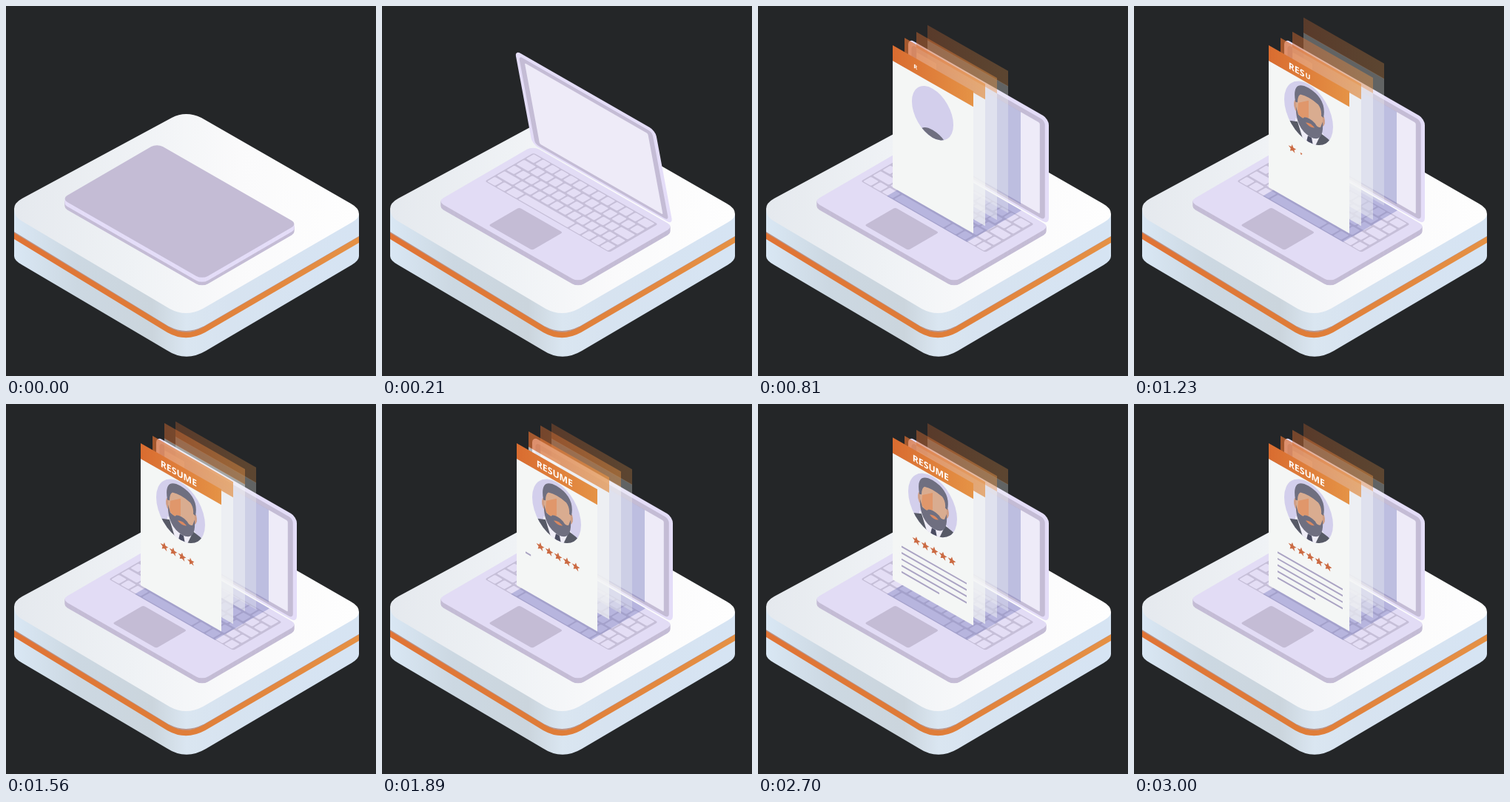
An HTML page with a canvas for the animation above (3.63 s loop, 500 by 500 pixels).

```html
<!DOCTYPE html>
<html lang="en">
<head>
<meta charset="utf-8">
<title>Resume on a laptop</title>
<style>
html, body { margin: 0; width: 100%; height: 100%; overflow: hidden; background: #242628; }
canvas { display: block; }
</style>
</head>
<body>
<canvas id="stage" width="500" height="500"></canvas>
<script>
const ctx = document.getElementById('stage').getContext('2d');
const LOOP = 3630, END = 3000, STEP = 30;
const W = 218, D = 150;            // laptop plane, in local units
const LILAC = '#e2dcf5', MAUVE = '#c4bcd5', RIM = '#e4ddf8';
const SHADE = 'rgba(104,108,180,.36)';

const prog = (t, start, dur) => Math.min(1, Math.max(0, (t - start) / dur));
const easeOut = p => 1 - (1 - p) ** 2;
const easeInOut = p => (1 - Math.cos(Math.PI * p)) / 2;
const backOut = p => 1 + 2.70158 * (p - 1) ** 3 + 1.70158 * (p - 1) ** 2;

function gradient(x0, x1, ...stops) {
  const g = ctx.createLinearGradient(x0, 0, x1, 0);
  stops.forEach(([at, color]) => g.addColorStop(at, color));
  return g;
}
function fill(path, color) {
  ctx.fillStyle = color;
  ctx.fill(new Path2D(path));
}
function stroke(path, color, width) {
  ctx.strokeStyle = color;
  ctx.lineWidth = width;
  ctx.stroke(new Path2D(path));
}
function box(x, y, w, h, r, color) {
  ctx.fillStyle = color;
  ctx.beginPath();
  ctx.roundRect(x, y, w, h, r);
  ctx.fill();
}
// Draws in a tilted plane spanned by a (W units) and b (D units)
function onPlane(x, y, a, b, draw) {
  ctx.save();
  ctx.transform(a[0] / W, a[1] / W, b[0] / D, b[1] / D, x, y);
  draw();
  ctx.restore();
}
function scaled(x, y, s, draw) {
  if (s <= 0) return;
  ctx.save();
  ctx.translate(x, y);
  ctx.scale(s, s);
  draw();
  ctx.restore();
}

const sideFill = gradient(11, 477, [0, '#d9e7f4'], [.18, '#ccd8e2'], [.4, '#cbd5dd'], [.5, '#dae6f1'], [.62, '#d7e3f0'], [1, '#d6e4f3']);
const topFill = gradient(11, 477, [0, '#e5e9ee'], [.35, '#eff2f5'], [.65, '#fafafb'], [1, '#fefefe']);
const bandFill = gradient(11, 477, [0, '#e07436'], [.45, '#df7c38'], [1, '#e59145']);
const headFill = gradient(0, 109, [0, '#d96c30'], [1, '#e59346']);

function drawPlatform() {
  const side = 'M11 274V338Q11 344 22 350L217 465Q243 482 270 466L467 350Q477 344 477 338V281L243 300Z';
  fill(side, sideFill);
  ctx.save();
  ctx.clip(new Path2D(side));
  stroke('M9 305L220 434Q243 446 267 434L479 311', '#b9958c', 2);
  stroke('M9 309.5L220 438Q243 451 267 438L479 314.5', bandFill, 7.4);
  ctx.restore();
  fill('M11 274Q11 266 22 260L224 151Q243 141 264 151L466 267Q477 273 477 281Q477 287 468 292L266 409Q243 421 221 409L22 291Q11 285 11 274Z', topFill);
}

const HINGE = [190, 109], FRONT = [-129, 75];

function drawKeyboard() {
  const x = .045 * W, y = .06 * D, w = .885 * W, h = .51 * D, rowH = h / 5;
  box(x, y, w, h, 3, '#c6bfd8');
  for (let r = 0; r < 5; r++) {
    const widths = r === 4 ? [1, 1, 1.3, 5.4, 1.3, 1, 1, 1] : Array(13).fill(1);
    if (r < 4) widths[r % 2 ? 0 : 12] = 1 + .25 * (r + 1);
    const unit = (w - 3) / widths.reduce((sum, k) => sum + k);
    let kx = x + 2;
    for (const k of widths) {
      box(kx, y + r * rowH + 1.6, k * unit - 2.4, rowH - 3, 1.5, '#e4def5');
      kx += k * unit;
    }
  }
}

function drawBase(shade) {
  for (let dy = 7; dy >= 0; dy--) {
    onPlane(204, 189 + dy, HINGE, FRONT, () => box(0, 0, W, D, 9, dy ? MAUVE : LILAC));
  }
  onPlane(204, 189, HINGE, FRONT, () => {
    drawKeyboard();
    box(.33 * W, .63 * D, .31 * W, .32 * D, 3, MAUVE);
    if (shade) box((.5 - .27 * shade) * W, 0, .57 * shade * W, .57 * D, 0, SHADE);
  });
}

function drawLid(t, shade) {
  const angle = easeInOut(prog(t, 0, 270)) * Math.PI / 2;
  const c = Math.cos(angle), s = Math.sin(angle);
  const rise = [FRONT[0] * c, FRONT[1] * c - 143 * s];
  const inside = s > c;
  if (!inside) {
    for (let dy = 6; dy > 0; dy--) {
      onPlane(204, 185.5 + dy * c, HINGE, rise, () => box(0, 0, W, D, 9, RIM));
    }
  }
  onPlane(204 - s, 185.5 + s, HINGE, rise, () => {
    box(0, 0, W, D, 9, inside ? RIM : MAUVE);
    if (!inside) return;
    box(5, 3, W - 11, D - 9, 6, MAUVE);
    box(13, 8, W - 27, D - 21, 2, '#eeebf8');
    if (shade) box((.5 - .3 * shade) * W, 6, .6 * shade * W, (D - 19) * shade, 0, SHADE);
  });
}

function drawMan() {
  const hair = '#6f6f80', skin = '#d9ac90';
  fill('M36 78H74V106H36Z', '#efedf7');
  fill('M14 108V92L30 85L39 81L49 108Z', '#575a66');
  fill('M98 108V88L80 81L71 79L60 108Z', '#575a66');
  fill('M53 92H58L61 106H50Z', '#4b4d62');
  fill('M35 54Q32 64 38 69H72Q78 64 75 54Z', '#cf9d84');
  fill('M37 46Q38 38 54 38Q72 38 73 46V70Q70 86 56 87Q40 86 37 70Z', skin);
  fill('M40 55L54 44V68Q48 69 45 73L39 69Z', '#e0976b');
  fill('M36 56Q31 28 54 27Q79 28 74 56L71 55Q72 46 67 42Q54 38 43 42Q39 46 39 55Z', hair);
  fill('M37 62L40 71Q47 74 48 70Q55 66 63 70Q65 74 70 71L73 62Q75 91 56 92Q36 91 37 62Z', hair);
  fill('M50 76Q56 72 62 76Q56 80 50 76Z', '#d98860');
}

function drawPortrait(t) {
  const s = easeOut(prog(t, 660, 245));
  if (!s) return;
  ctx.save();
  ctx.beginPath();
  ctx.ellipse(54, 61, 33 * s, 39 * s, 0, 0, 7);
  ctx.fillStyle = '#d3cfec';
  ctx.fill();
  ctx.clip();
  ctx.translate(0, 70 * (1 - easeOut(prog(t, 780, 300))));
  drawMan();
  ctx.restore();
}

function drawTitle(t) {
  ctx.font = 'bold 12.2px "Open Sans", "Noto Sans", sans-serif';
  ctx.textAlign = 'center';
  ctx.fillStyle = '#fff';
  let x = 26.8;
  [...'RESUME'].forEach((ch, i) => {
    const w = ctx.measureText(ch).width;
    scaled(x + w / 2, 11.5, easeOut(prog(t, 742 + 132 * i, 180)), () => ctx.fillText(ch, 0, 4.5));
    x += w;
  });
}

function drawStars(t) {
  for (let i = 0; i < 5; i++) {
    const p = easeOut(prog(t, 1080 + 120 * i, 180));
    scaled(32 + 12 * i, 121.5, p, () => {
      ctx.rotate((p - 1) * 2);
      ctx.beginPath();
      for (let k = 0; k < 10; k++) {
        const r = k % 2 ? 2.5 : 5.7, a = k * Math.PI / 5;
        ctx.lineTo(r * Math.sin(a), -r * Math.cos(a));
      }
      ctx.fillStyle = '#cb6a42';
      ctx.fill();
    });
  }
}

function drawLines(t) {
  for (let i = 0; i < 5; i++) {
    const p = prog(t, 1880 + 122 * i, 122);
    if (p) stroke(`M12 ${140.6 + 8.6 * i}h${(i < 4 ? 88 : 51) * p}`, '#aaa3c3', 2.2);
  }
}

// Back to front: place, opacity and time of entry
const pages = [
  { x: 229, y: 26, alpha: .29, enter: 382 },
  { x: 214, y: 35, alpha: .45, enter: 350 },
  { x: 198, y: 43, alpha: .7, enter: 211 },
  { x: 182, y: 53, alpha: 1, enter: 316 }
];

function drawPage({ x, y, alpha, enter }, i, t) {
  const s = backOut(prog(t, enter, 360));
  if (s <= 0.01) return;
  // A wave of hops runs from the back sheet to the front one
  const phase = Math.max(-1, Math.min(1, (t - 1235 - 435 * i) / 480));
  const up = 10.5 * Math.cos(phase * Math.PI / 2) ** 2;
  ctx.save();
  // Grows from a point near the foot of the sheet
  ctx.transform(s, .57 * s, 0, s, x + 54.5 * (1 - s), y - up + 212 * (1 - s));
  ctx.globalAlpha = alpha;
  box(0, 20.5, 109, 171.5, 0, '#f4f6f5');
  box(0, 0, 109, 21, 0, headFill);
  if (alpha === 1) {
    drawTitle(t);
    drawPortrait(t);
    drawStars(t);
    drawLines(t);
  }
  ctx.restore();
}

function draw(t) {
  ctx.fillStyle = '#242628';
  ctx.fillRect(0, 0, 500, 500);
  drawPlatform();
  const shade = easeOut(prog(t, 345, 260));
  drawBase(shade);
  drawLid(t, shade);
  pages.forEach((page, i) => drawPage(page, i, t));
}

const begin = performance.now();
function tick() {
  const t = (performance.now() - begin) % LOOP;
  draw(Math.min(END, Math.floor(t / STEP) * STEP));
  requestAnimationFrame(tick);
}
tick();
</script>
</body>
</html>
```
